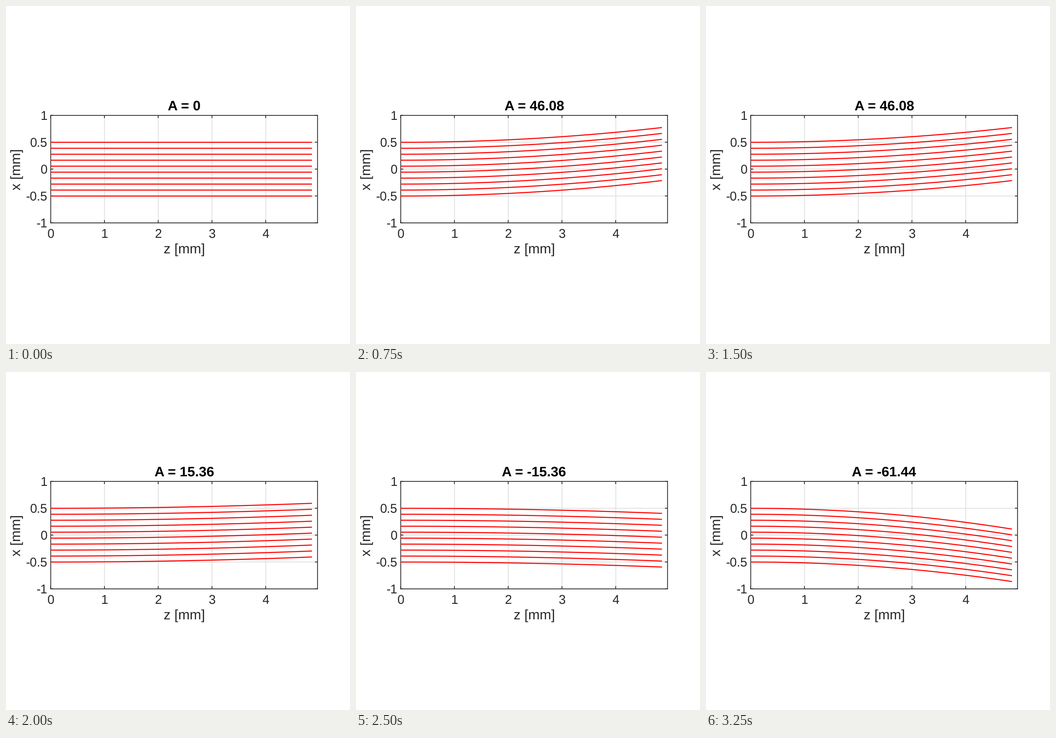
Recreate the animation shown at these times as a matplotlib script. Size 755 by 742 pixels, loop 3500 ms.

```python
import numpy as np
import matplotlib.pyplot as plt
from matplotlib.animation import FuncAnimation
from matplotlib.transforms import Affine2D

W, H, DPI = 755, 742, 100
LEFT, RIGHT, TOP, BOTTOM = 98.25, 683.7, 240.2, 476.2
UNIT = (BOTTOM - TOP) / 2            # pixels per mm
MID_X, MID_Y = (LEFT + RIGHT) / 2, (TOP + BOTTOM) / 2
INK = "#262626"
STEPS, INTERVAL = 14, 250
A_STEP = 15.36
INDEX_SLOPE = 1.033e-3               # relative gradient of n^2 per unit of A

plt.rcParams.update({
    "font.family": "Liberation Sans",
    "text.hinting": "none",
    "path.snap": False,
})


def pt(px):
    return px * 72 / DPI


fig = plt.figure(figsize=(W / DPI, H / DPI), dpi=DPI, facecolor="white")
ax = fig.add_axes([LEFT / W, 1 - BOTTOM / H, (RIGHT - LEFT) / W, (BOTTOM - TOP) / H])
ax.set(xlim=(0, (RIGHT - LEFT) / UNIT), ylim=(-1, 1),
       xticks=range(5), yticks=np.linspace(-1, 1, 5))
ax.set_axisbelow(True)
ax.grid(color="#dedede", linewidth=pt(1.6))
ax.tick_params(direction="in", length=pt(6.2), width=pt(1.7), color=INK,
               top=True, right=True, labelbottom=False, labelleft=False)
for spine in ax.spines.values():
    spine.set(color=INK, linewidth=pt(1.7))

# Pixel coordinates with the origin at the top left
pixels = Affine2D().scale(1 / W, -1 / H).translate(0, 1) + fig.transFigure


def label(x, y, text, size, ha="center", color=INK, **style):
    return fig.text(x, y, text, transform=pixels, fontsize=pt(size), ha=ha,
                    va="baseline", color=color, rotation_mode="anchor", **style)


for z in range(5):
    label(LEFT + z * UNIT, 509, f"{z}", 27.5)
for x in np.linspace(-1, 1, 5):
    label(91, MID_Y - x * UNIT + 10, f"{x:g}", 27.5, ha="right")
label(MID_X, 543, "z [mm]", 30.25)
label(32, MID_Y, "x [mm]", 30.25, rotation=90)
title = label(MID_X, 229.5, "", 30.25, color="black", weight="bold")

z = np.linspace(0, (671.5 - LEFT) / UNIT, 120)
starts = np.linspace(-0.5, 0.5, 10)
rays = [ax.plot([], [], color="red", linewidth=pt(2.3), zorder=3,
                solid_capstyle="butt")[0] for _ in starts]


def update(i):
    # Rise to the peak, hold it for one step, then fall to the negative peak
    a = A_STEP * (i if i < 5 else 9 - i)
    slope = INDEX_SLOPE * a
    for ray, x0 in zip(rays, starts):
        ray.set_data(z, x0 + slope * z**2 / (4 * (1 + slope * x0)))
    title.set_text(f"A = {a:g}")
    return [*rays, title]


anim = FuncAnimation(fig, update, frames=STEPS, interval=INTERVAL,
                     repeat=True, repeat_delay=0)
plt.show()
```
